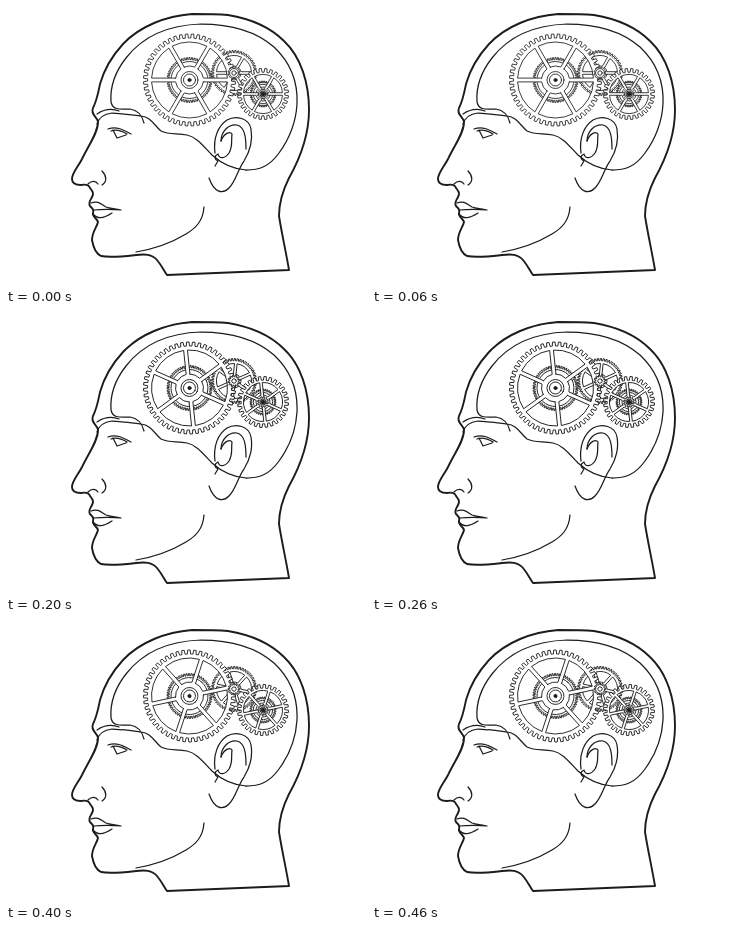
Write an HTML page that moves like this. It is 360 px wide and 280 px high and loops after 500 ms.

```html
<!DOCTYPE html>
<html lang="en">
<head>
<meta charset="utf-8">
<title>Clockwork mind</title>
<style>
html, body { margin: 0; width: 100%; height: 100%; overflow: hidden; background: #fff; }
svg { display: block; width: 360px; height: 280px; }
path, circle { stroke: #1c1c1c; stroke-linecap: round; stroke-linejoin: round; }
.line { fill: none; stroke-width: 1.25; }
.head { fill: none; stroke-width: 1.9; }
.gear path, .gear circle { stroke-width: .85; fill: #fff; fill-rule: evenodd; }
.gear .dot { fill: #1c1c1c; }
</style>
</head>
<body>
<svg viewBox="0 0 360 280">
  <path class="head" d="M161 269 L283 264 C280 246 276 229 273 210 C273 195 277 184 283 172 C292 156 303 130 303 104 C303 77 295 51 278 35 C265 22 246 13 222 9 C210 8 198 8 186 8 C160 10 134 20 117 38 C106 50 98 64 94 78 C92 88 91 94 87 102 C84 109 92 111 92 116 C92 127 82 140 76 153 C72 161 66 167 66 173 C66 178 70 179 75 179 C80 178 83 179 84 182 C87 186 88 187 86 191 C84 195 82 197 84 200 C87 203 88 204 87 207 C86 211 91 212 92 216 C91 221 86 226 86 234 C87 240 89 247 95 250 C105 252 121 250 130 249 C139 248 146 248 151 254 C156 260 158 265 161 269 Z"/>
  <g class="line">
    <path d="M240 164 C226 163 215 157 206 149 C198 141 191 131 181 129 C171 127 163 129 155 125 C148 119 145 111 135 110 C120 108 113 107 106 107 C98 108 93 111 91 118"/>
    <path d="M91 108 C97 104 105 102 113 105"/>
    <path d="M138 117 C136 109 131 104 124 103 C115 103 107 105 105 96 C104 82 109 66 120 52 C137 30 163 19 195 18 C225 18 251 26 268 41 C284 56 292 76 291 98 C290 115 284 132 273 147 C263 161 253 164 240 164"/>
    <path d="M102 123 C110 120 116 123 125 128"/>
    <path d="M105 125 C110 123 116 125 121 128 M107 124 L111 132 L120 129"/>
    <path d="M96 165 C101 170 101 176 96 179 M82 178 C86 174 90 175 92 178"/>
    <path d="M85 197 C92 194 96 199 100 201 C105 203 109 202 115 204 C105 203 98 203 87 204"/>
    <path d="M87 208 C92 214 98 212 106 207"/>
    <path d="M198 201 C197 215 190 222 180 228 C165 237 148 243 130 246"/>
    <path d="M209 147 C207 132 212 120 221 114 C230 109 243 112 245 123 C247 135 243 147 238 155 C232 163 230 175 223 182 C216 189 208 186 203 172"/>
    <path d="M240 143 C240 132 239 121 231 119 C222 118 215 126 215 135"/>
    <path d="M215 135 C218 127 224 125 226 128 C225 136 227 140 223 147 C219 153 213 153 212 148 C208 150 208 153 212 155 L209 160"/>
  </g>
  <g id="gears"></g>
</svg>
<script>
const NS = 'http://www.w3.org/2000/svg';
const TAU = Math.PI * 2;
const STEP = 100, STEPS = 5, TURN = 12;
const stage = document.getElementById('gears');

function add(parent, tag, attrs) {
  const el = document.createElementNS(NS, tag);
  for (const key in attrs) el.setAttribute(key, attrs[key]);
  return parent.appendChild(el);
}

const at = (r, a) => (r * Math.cos(a)).toFixed(2) + ' ' + (r * Math.sin(a)).toFixed(2);

function teeth(n, outer, root) {
  const pts = [];
  for (let i = 0; i < n; i++) {
    [[0, root], [.22, root], [.3, outer], [.72, outer], [.8, root]]
      .forEach(([f, r]) => pts.push(at(r, (i + f) / n * TAU)));
  }
  return 'M' + pts.join('L') + 'Z';
}

// Openings between spokes of constant width.
function windows(n, outer, inner, half) {
  let d = '';
  const o = Math.asin(half / outer), k = Math.asin(half / inner);
  for (let i = 0; i < n; i++) {
    const a = i / n * TAU, b = (i + 1) / n * TAU;
    d += `M${at(inner, a + k)}L${at(outer, a + o)}A${outer} ${outer} 0 0 1 ${at(outer, b - o)}` +
         `L${at(inner, b - k)}A${inner} ${inner} 0 0 0 ${at(inner, a + k)}Z`;
  }
  return d;
}

const ring = r => `M${r} 0A${r} ${r} 0 1 1 ${-r} 0A${r} ${r} 0 1 1 ${r} 0Z`;

function gear(x, y, dir, d, rings = [], dot = 0) {
  const g = add(stage, 'g', { class: 'gear' });
  add(g, 'path', { d });
  rings.forEach(r => add(g, 'circle', { r }));
  if (dot) add(g, 'circle', { r: dot, class: 'dot' });
  return { g, x, y, dir };
}

const gears = [
  gear(228, 67, -1, teeth(48, 22.5, 20.3) + windows(6, 17.5, 7, 1.3)),
  gear(183.5, 74, -1, teeth(54, 22.5, 20.3) + ring(18.5)),
  gear(183.5, 74, 1, teeth(48, 46, 42) + windows(6, 38, 14, 1.9), [8.5, 6], 1.6),
  gear(228, 67, -1, teeth(12, 6, 4.2), [2.2]),
  gear(257, 88, -1, teeth(36, 13, 11.2) + ring(9.7)),
  gear(257, 88, 1, teeth(28, 25.5, 21.8) + windows(6, 19.5, 7, 1.3)),
  gear(257, 88, 1, teeth(12, 5.5, 4), [3], 2)
];

function draw() {
  const turn = Math.floor(performance.now() / STEP) % STEPS * TURN;
  for (const { g, x, y, dir } of gears)
    g.setAttribute('transform', `translate(${x} ${y}) rotate(${dir * turn})`);
  requestAnimationFrame(draw);
}
draw();
</script>
</body>
</html>
```
